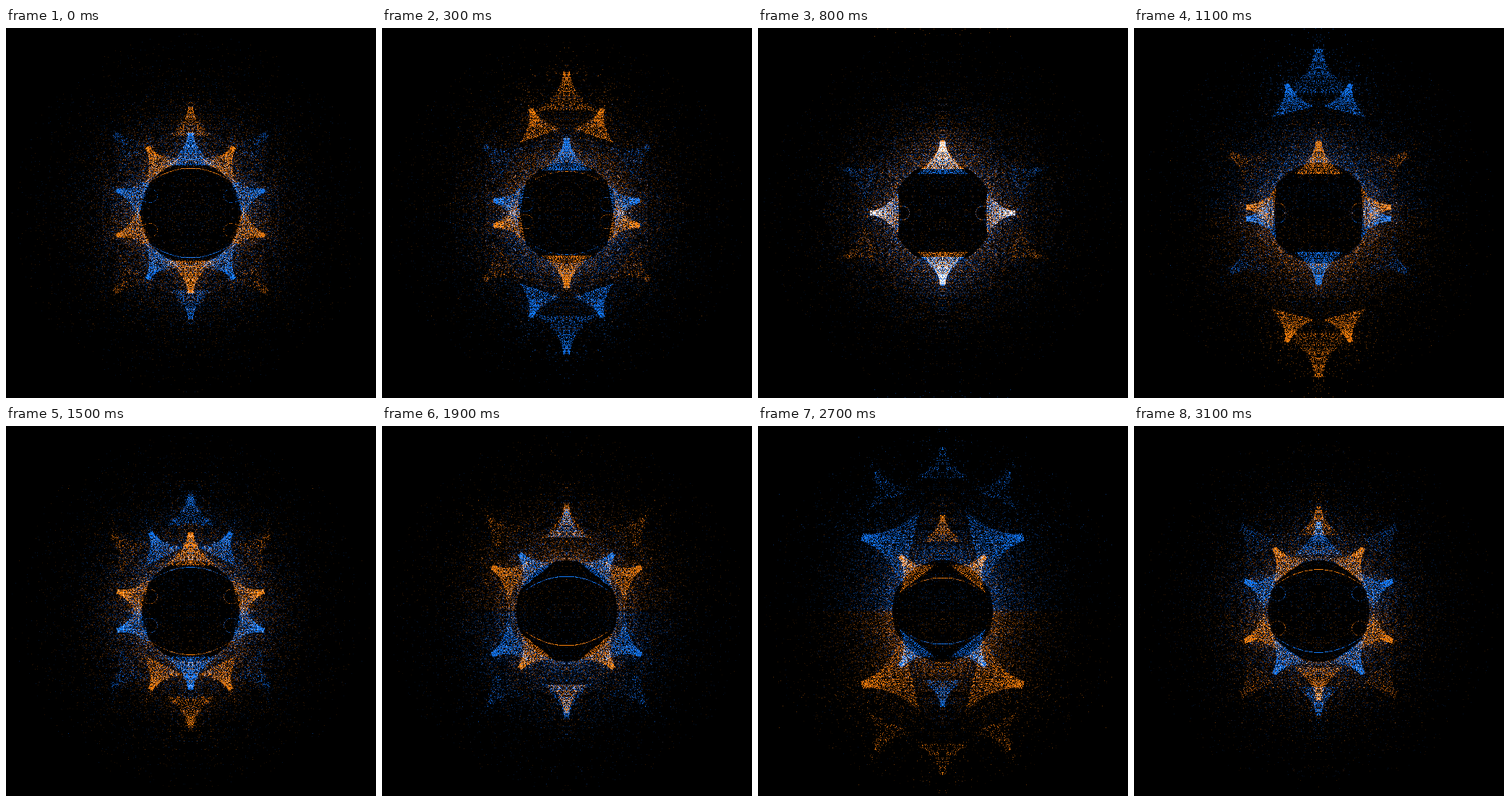
Recreate the animation shown at these times as an HTML page with a canvas. Size 512 by 512 pixels, loop 3.2 s.

```html
<!DOCTYPE html>
<html>
<head>
<meta charset="utf-8">
<style>
html, body { margin: 0; width: 100%; height: 100%; overflow: hidden; background: #000; }
canvas { display: block; width: 100vw; height: 100vh; image-rendering: pixelated; }
</style>
</head>
<body>
<canvas id="stage" width="512" height="512"></canvas>
<script>
const SIZE = 512, LOOP = 3200, STEP = 100;
const ctx = document.getElementById('stage').getContext('2d');
const image = ctx.createImageData(SIZE, SIZE);
const blue = new Float32Array(SIZE * SIZE);
const orange = new Float32Array(SIZE * SIZE);

// All tracks below give one value for each of these phases.
const phases = [-800, -700, -500, -300, 0, 500, 800];
const flank = { u: [50, 50, 68, 80, 78, 75, 75], v: [62, 62, 92, 48, 24, 6, 0] };
const lower = { u: [50, 51, 43, 49, 46, 38, 0], v: [-62, -60, -56, -60, -70, -154, -75] };
const outer = { u: [100, 95, 80, 92, 86, 98, 110], v: [120, 135, 168, 110, 90, 66, 50] };
const crown = [138, 153, 200, 118, 82, 70, 70];
const foot = [-138, -125, -109, -116, -121, -188, -290];
const blueAbove = [.5, .5, .82, .74, .5, .24, .5];
const arcDepth = [50, 50, 46, 48, 62, 55, 55];
const arcDots = [160, 160, 60, 120, 90, 0, 0];

let seed = 1;
function rand() {
  seed = (seed + 0x6D2B79F5) | 0;
  let k = Math.imul(seed ^ (seed >>> 15), 1 | seed);
  k = (k + Math.imul(k ^ (k >>> 7), 61 | k)) ^ k;
  return ((k ^ (k >>> 14)) >>> 0) / 4294967296;
}
const spread = () => -Math.log(1 - rand());

function sample(track, phase) {
  let i = 1;
  while (i < phases.length - 1 && phases[i] < phase) i++;
  const f = (phase - phases[i - 1]) / (phases[i] - phases[i - 1]);
  return track[i - 1] + (track[i] - track[i - 1]) * f;
}

function hit(layer, x, y, strength) {
  x = Math.floor(x);
  y = Math.floor(y);
  if (x < 0 || y < 0 || x >= SIZE || y >= SIZE) return;
  const i = y * SIZE + x;
  layer[i] = Math.min(1.25, layer[i] + strength);
}

// Mirrored sideways; the upside-down copy takes the other colour.
function plot(u, v, strength) {
  for (const x of [255.5 + u, 255.5 - u]) {
    hit(blue, x, 256 - v, strength);
    hit(orange, x, 256 + v, strength);
  }
}

// A fan, wide on the side facing the centre and tapering outwards.
function drawCloud(u, v, width, dots, lean = 0) {
  const angle = Math.atan2(u, v) + lean;
  const sin = Math.sin(angle), cos = Math.cos(angle);
  for (let i = 0; i < dots; i++) {
    const q = rand() ** 1.4;
    let x = rand() * 2 - 1;
    if (rand() < .45) x = Math.round(x * 9) / 9;
    let along = (q - .35) * 1.5 * width;
    let across = width * x * ((1 - q) ** 2 + .13);
    let strength = .65 + .35 * rand();
    if (rand() < .27) {
      along += width * .55 * (spread() - .35);
      across += width * (rand() - .5) * 1.8 * spread();
      strength *= .65;
    }
    plot(u + sin * along + cos * across, v + cos * along - sin * across, strength);
  }
}

function drawClouds(phase) {
  const at = track => sample(track, phase);
  const swell = Math.exp(-(((phase + 500) / 120) ** 2));
  const top = at(crown), bottom = at(foot);
  drawCloud(at(flank.u), at(flank.v), 26 + 20 * swell, 920 * (1 + swell), .7 * swell);
  drawCloud(at(lower.u), at(lower.v), 26, 900);
  drawCloud(at(outer.u), at(outer.v), 29, 170);
  drawCloud(0, top, 30, 650 * Math.min(1.1, (82 / top) ** 2));
  drawCloud(0, bottom, -.22 * bottom, 270 - Math.min(0, bottom + 125) * 3);
}

function drawHaze(share) {
  for (let i = 0; i < 5200; i++) {
    const inner = i < 260;
    const r = inner ? 72 * Math.sqrt(rand()) : 70 + spread() * 52;
    const a = rand() * Math.PI;
    const up = rand() < share ? 1 : -1;
    const strength = (.25 + .5 * rand()) * (inner ? .6 : Math.max(.35, 1.25 - r / 210));
    if (r < 248) plot(r * Math.cos(a), up * r * Math.sin(a), strength);
  }
}

function drawArcs(phase) {
  const depth = sample(arcDepth, phase), dots = sample(arcDots, phase);
  for (let i = 0; i < dots; i++) {
    const u = 60 * rand() ** 1.4;
    plot(u, -depth + u * u / 170, .9 - u / 120);
  }
  if (phase < -200) return;
  const height = 24 * Math.max(0, 1 - Math.max(0, phase) / 600);
  for (let i = 0; i < 45; i++) {
    const a = rand() * Math.PI * 2;
    plot(57 + 11 * Math.cos(a), height + 10 * Math.sin(a), .45);
  }
}

function render(step) {
  const t = step * STEP;
  const swapped = t > 800 && t < 2400;
  const phase = swapped ? 1600 - t : t >= 2400 ? t - LOOP : t;
  seed = 977 + step * 7919;
  blue.fill(0);
  orange.fill(0);
  drawHaze(sample(blueAbove, phase));
  drawClouds(phase);
  drawArcs(phase);

  const [cool, warm] = swapped ? [orange, blue] : [blue, orange];
  const px = image.data;
  for (let i = 0, p = 0; i < cool.length; i++, p += 4) {
    px[p] = 15 * cool[i] + 215 * warm[i];
    px[p + 1] = 100 * cool[i] + 106 * warm[i];
    px[p + 2] = 220 * cool[i] + 10 * warm[i];
    px[p + 3] = 255;
  }
  ctx.putImageData(image, 0, 0);
}

let shown = -1;
function tick() {
  const step = Math.floor(performance.now() % LOOP / STEP);
  if (step !== shown) render(shown = step);
  requestAnimationFrame(tick);
}
tick();
</script>
</body>
</html>
```
